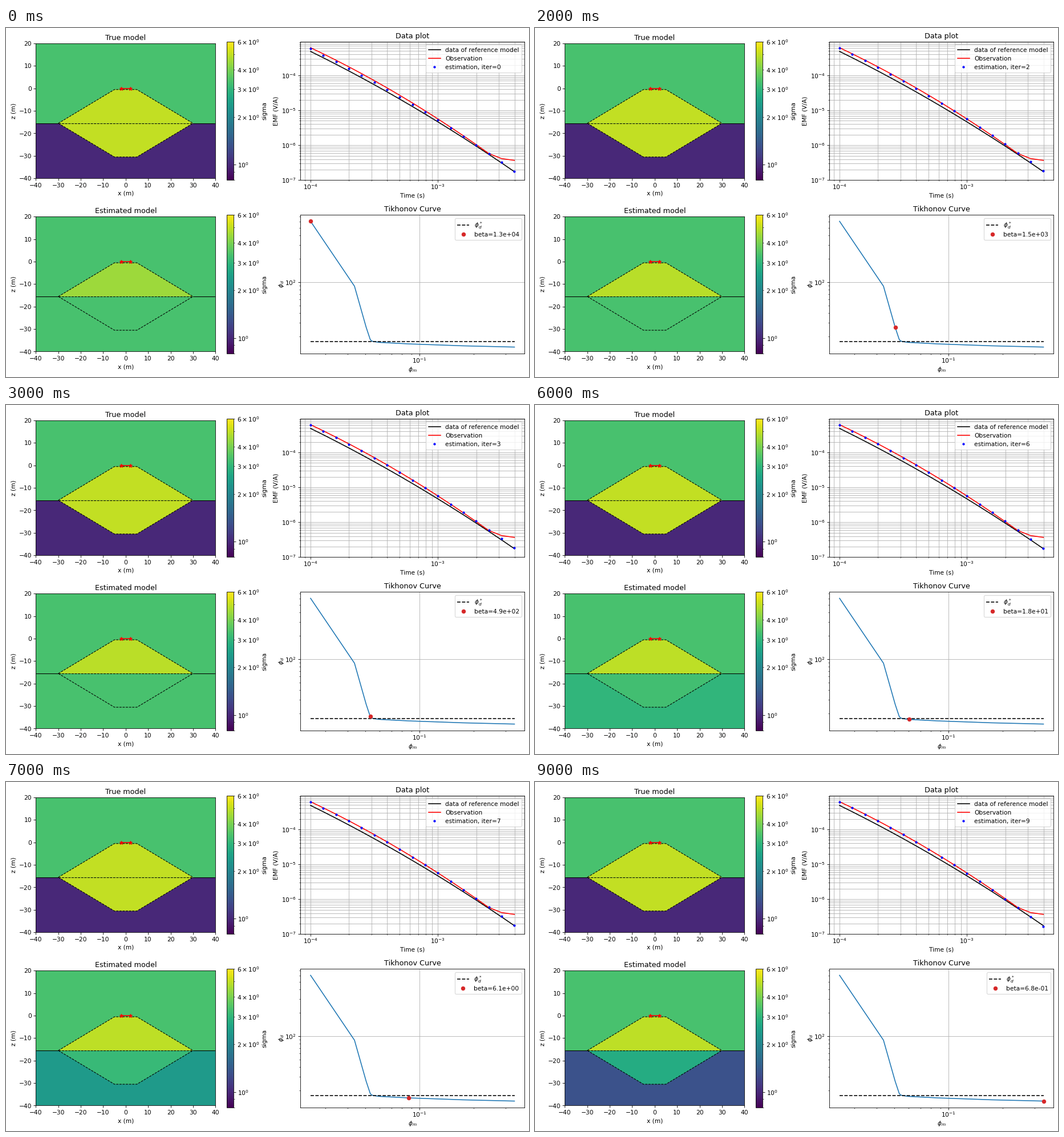
A matplotlib script for the animation above (10 s loop, 917 by 611 pixels).

```python
import numpy as np
import matplotlib.pyplot as plt
from matplotlib.animation import FuncAnimation
from matplotlib.cm import ScalarMappable
from matplotlib.colors import LogNorm

W, H, DPI = 917, 611, 76.2
ROUNDS = 10
SEA = 3.33

plt.rcParams["font.family"] = "DejaVu Sans"
fig = plt.figure(figsize=((W + 1e-6) / DPI, (H + 1e-6) / DPI), dpi=DPI)
scale = ScalarMappable(LogNorm(0.8, 6), "viridis")


def add_axes(left, top, right, bottom):
    """Axes from pixel edges measured from the top left corner."""
    return fig.add_axes([left / W, 1 - bottom / H,
                         (right - left) / W, (bottom - top) / H])


# --- progress of the inversion ---------------------------------------------
def settle(i):
    """Remaining error of the upper mound, fading from 1."""
    return np.exp(-1.1 * i)


def drop(i):
    """Log decrease of the deep layer, flat at first and then linear."""
    return 0.15 * np.log1p(np.exp(2 * (i - 5.95)))


def layers(i):
    """Conductivity of sea, deep layer, upper and lower mound."""
    return (SEA, SEA * np.exp(-drop(i)),
            4.9 - 0.45 * settle(i), SEA * np.exp(-0.2 * drop(i)))


# --- conductivity sections -------------------------------------------------
UPPER = np.array([(-30, -15.5), (-5, -0.5), (5, -0.5), (30, -15.5)])
LOWER = UPPER * [1, -1] + [0, -31]


def paint(zones, values):
    for zone, value in zip(zones, values):
        zone.set_color(scale.to_rgba(value))


def section(title, top, values):
    """Draw one model panel and return its four coloured zones."""
    ax = add_axes(52.4, top + 3.1, 367.2, top + 239.2)
    ax.set(xlim=(-40, 40), ylim=(-40, 20), title=title,
           xlabel="x (m)", ylabel="z (m)", yticks=range(-40, 21, 10))
    shapes = [
        [(-40, -15.5), (-40, 20), (40, 20), (40, -15.5)],
        [(-40, -40), (-40, -15.5), (40, -15.5), (40, -40)],
        UPPER, LOWER,
    ]
    zones = [ax.fill(*np.transpose(s), lw=0)[0] for s in shapes]
    paint(zones, values)
    for line in (UPPER, LOWER, UPPER[[0, 3]]):
        ax.plot(*line.T, "k--", lw=1)
    for side in (-1, 1):
        ax.plot([40 * side, 30 * side], [-15.5, -15.5], "k-", lw=1)
    ax.plot([-2, 2], [0, 0], "r*-")

    bar = fig.colorbar(scale, cax=add_axes(386.7, top, 398.8, top + 242.3))
    bar.set_label("sigma")
    return zones


section("True model", 24, (SEA, 1, 5, 5))
zones = section("Estimated model", 327.3, layers(0))

# --- decay curves ----------------------------------------------------------
k = np.arange(17)
times = 10 ** (-4 + k / 10)


def emf(y):
    """Voltage at pixel row y."""
    return 10 ** (-7 + (266.3 - y) / 61.1)


def decay(start, middle, end):
    """Smooth decay through the rows of its first, middle and last sample."""
    return emf(np.polyval(np.polyfit([0, 8, 16], [start, middle, end], 2), k))


def estimate(i):
    s = settle(i)
    return decay(34.7 + 1.8 * s, 131.6 + 2.2 * s, 250.4 + 0.5 * s + 2.8 * drop(i))


# late samples are lifted by noise
observed = decay(34.5, 131.2, 252.5) + 1e-7 * np.maximum(k - 14, 0)

ax = add_axes(516.1, 24, 909.2, 266.3)
ax.loglog(times, decay(41, 137.5, 251.5), "k", label="data of reference model")
ax.loglog(times, observed, "r", label="Observation")
dots, = ax.loglog(times, estimate(0), "b.", label="estimation, iter=0")
ax.set(xlim=(10 ** -4.08, 10 ** -2.32), ylim=(1e-7, emf(24)), title="Data plot")
ax.set_xlabel("Time (s)", labelpad=3)
ax.set_ylabel("EMF (V/A)")
ax.tick_params(axis="x", pad=1.5)
ax.grid(True, which="both")
dots_text = ax.legend(loc="upper right").get_texts()[2]

# --- trade-off curve -------------------------------------------------------
def phi_m(x):
    return 10 ** (-1 + (x - 725) / 315.6)


def phi_d(y):
    return 10 ** (2 + (445 - y) / 135.6)


# one pixel position per iteration
knots = np.array([(534, 338.4), (611, 452), (631.5, 524), (638.5, 545),
                  (641, 548), (644.5, 549), (656, 550.5), (705.5, 553),
                  (800.5, 556.4), (891.5, 558.6)])
curve_m, curve_d = phi_m(knots[:, 0]), phi_d(knots[:, 1])

ax = add_axes(516.1, 327.3, 909.2, 569.8)
ax.loglog(curve_m, curve_d)
ax.loglog(curve_m[[0, -1]], [17, 17], "k--", label=r"$\phi_d^*$")
spot, = ax.loglog([], [], "o", color="C3", label="beta")
ax.set(xlim=(phi_m(516.1), phi_m(909.2)), ylim=(phi_d(569.8), phi_d(327.3)),
       title="Tikhonov Curve")
ax.set_xlabel(r"$\phi_m$", labelpad=2)
ax.set_ylabel(r"$\phi_d$", labelpad=-1)
ax.tick_params(axis="x", pad=1.5)
ax.grid(True)
spot_text = ax.legend(loc="upper right", labelspacing=0.3).get_texts()[1]


def update(i):
    paint(zones, layers(i))
    dots.set_ydata(estimate(i))
    dots_text.set_text(f"estimation, iter={i}")
    spot.set_data([curve_m[i]], [curve_d[i]])
    spot_text.set_text(f"beta={13300 / 3 ** i:.1e}")
    return []


anim = FuncAnimation(fig, update, frames=ROUNDS, init_func=lambda: update(0),
                     interval=1000, repeat=True, repeat_delay=0)
plt.show()
```
